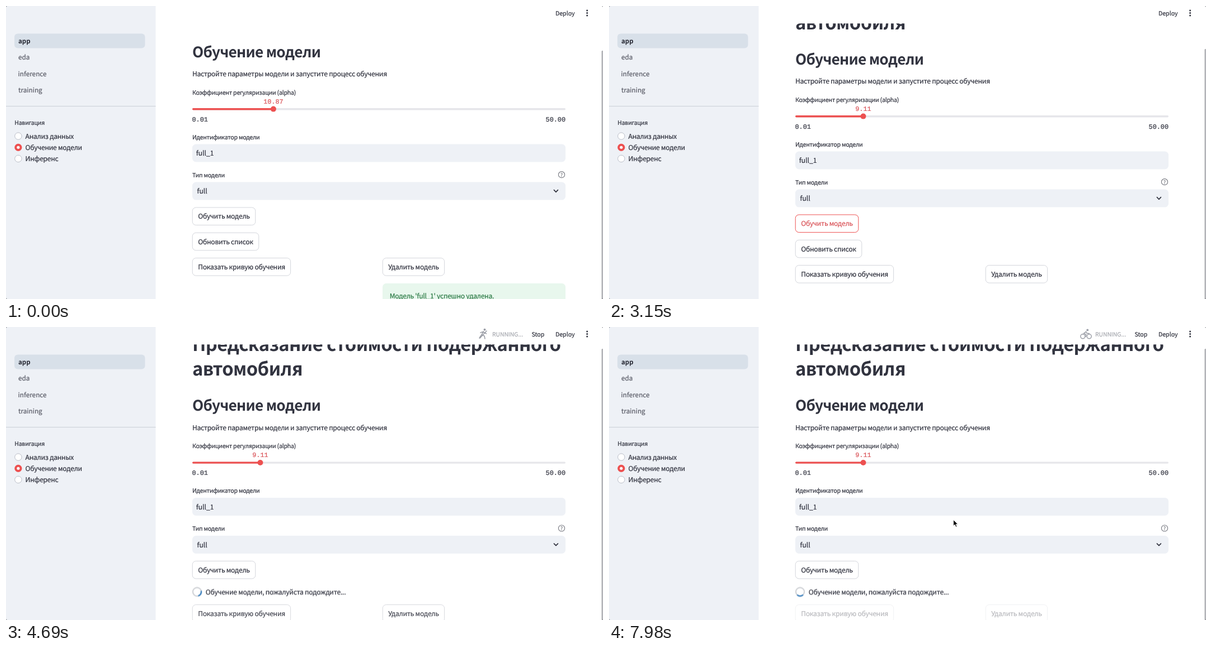
Write an HTML page that moves like this. It is 1067 px wide and 525 px high and loops after 8000 ms.

```html
<!DOCTYPE html>
<html lang="ru">
<head>
<meta charset="utf-8">
<title>Обучение модели</title>
<style>
  :root {
    --ink: #31333f; --red: #ed5050; --line: #d3d5db; --panel: #eef1f6;
    --sans: 'Noto Sans CJK SC', 'Noto Sans CJK JP', 'Noto Sans', sans-serif;
  }
  html, body { margin: 0; width: 100%; height: 100%; overflow: hidden; background: #fff; }
  svg { display: block; }
  text {
    font: 12.07px var(--sans); letter-spacing: -.0205em; color: var(--ink);
    fill: currentColor; stroke: currentColor; stroke-width: .22px;
    text-rendering: geometricPrecision; white-space: pre;
  }
  .small { font-size: 10.56px; }
  .latin, .nav, .mono { letter-spacing: 0; }
  .nav { font-size: 11.75px; color: #5b5d68; }
  .nav.on { font-weight: 700; font-size: 11.5px; color: #262833; stroke: none; }
  .mono { font: 11.8px 'Liberation Mono', monospace; }
  .h1 { font-size: 32.7px; font-weight: 700; letter-spacing: -.018em; stroke: none; }
  .h2 { font-size: 26.2px; font-weight: 700; letter-spacing: -.027em; stroke: none; }
  .field { fill: var(--panel); }
  .btn { fill: #fff; stroke: var(--line); }
  .radio { fill: #fff; stroke: #babec8; }
  .icon { fill: none; stroke: #9a9da6; stroke-width: 1.5; stroke-linecap: round; stroke-linejoin: round; }
  .icon .head { fill: #9a9da6; stroke: none; }

  .anim { animation: 8s step-end infinite; }
  #page { animation-name: scroll; }
  #tail { animation-name: push; }
  #stale { animation-name: stale; }
  #bar { animation-name: bar; }
  #done { animation-name: done; }
  #refresh { animation-name: refresh; }
  #wait { animation-name: wait; }
  #status { animation-name: status; }
  #cursor { animation-name: cursor; }
  #train rect { animation-name: press; }
  #train text { animation-name: pressText; }
  #arc { transform-origin: 341.5px 416.1px; animation: spin 8s linear infinite; }

  @keyframes scroll {
    0% { transform: translateY(0); }
    24.5% { transform: translateY(13px); }
    48.125%, 100% { transform: translateY(58.4px); }
  }
  @keyframes push {
    0% { transform: translateY(0); }
    24.5% { transform: translateY(13px); }
    55.125%, 100% { transform: translateY(46px); }
  }
  @keyframes bar {
    0% { transform: translateY(80px); }
    24.5% { transform: translateY(77px); }
    48.125%, 100% { transform: translateY(39px); }
  }
  @keyframes stale {
    0% { opacity: 1; }
    54.375% { opacity: 1; animation-timing-function: ease-in; }
    66.875%, 100% { opacity: .33; }
  }
  @keyframes done { 0% { opacity: 1; } 24.5%, 100% { opacity: 0; } }
  @keyframes refresh { 0% { opacity: 1; } 48.125%, 100% { opacity: 0; } }
  @keyframes wait { 0% { opacity: 0; } 55.125%, 100% { opacity: 1; } }
  @keyframes cursor { 0% { opacity: 0; } 98.875%, 100% { opacity: 1; } }
  @keyframes status {
    0% { opacity: 0; }
    48.125% { opacity: 0; animation-timing-function: linear; }
    51.625%, 100% { opacity: 1; }
  }
  @keyframes press {
    0% { stroke: var(--line); fill: #fff; }
    38% { stroke: var(--line); fill: #fff; animation-timing-function: linear; }
    39.375% { stroke: var(--red); fill: #fff; }
    42% { stroke: var(--red); fill: var(--red); }
    45.5% { stroke: var(--red); fill: #fff; }
    48.125% { stroke: var(--red); fill: #fff; animation-timing-function: linear; }
    51.625%, 100% { stroke: var(--line); fill: #fff; }
  }
  @keyframes pressText {
    0% { color: var(--ink); }
    38% { color: var(--ink); animation-timing-function: linear; }
    39.375% { color: #d95257; }
    42% { color: #fff; }
    45.5% { color: #d95257; }
    48.125% { color: #d95257; animation-timing-function: linear; }
    51.625%, 100% { color: var(--ink); }
  }
  @keyframes spin {
    from { transform: rotate(-1503.5deg); }
    to { transform: rotate(1265.7deg); }
  }
</style>
</head>
<body>
<svg width="1067" height="525" viewBox="0 0 1067 525">
  <rect width="1067" height="525" fill="#fff"/>

  <g id="page" class="anim">
    <text class="h1" x="333" y="-15.1">Предсказание стоимости подержанного</text>
    <text class="h1" x="333" y="29">автомобиля</text>
    <text class="h2" x="333" y="92">Обучение модели</text>
    <text x="333" y="126.4">Настройте параметры модели и запустите процесс обучения</text>

    <text class="small" x="333" y="159">Коэффициент регуляризации (alpha)</text>
    <rect x="333" y="183" width="667" height="3.4" rx="1.7" fill="#e6e6ea"/>
    <rect id="fill" x="333" y="183" width="144" height="3.4" rx="1.7" fill="var(--red)"/>
    <circle id="thumb" cx="477.9" cy="184.6" r="5" fill="var(--red)"/>
    <text id="value" class="mono" x="477.9" y="175" text-anchor="middle" style="color:#d95257">10.87</text>
    <text class="mono" x="332.5" y="207">0.01</text>
    <text class="mono" x="1000" y="207" text-anchor="end">50.00</text>

    <text class="small" x="333" y="238.6">Идентификатор модели</text>
    <rect class="field" x="333" y="247.5" width="667" height="32" rx="6.5"/>
    <text class="latin" x="339.8" y="268.3">full_1</text>

    <text class="small" x="333" y="306.6">Тип модели</text>
    <circle cx="993" cy="302.2" r="5.6" fill="none" stroke="#75777f" stroke-width="1.1"/>
    <text class="latin" x="993" y="305.5" text-anchor="middle" style="font-size:9.2px;color:#75777f">?</text>
    <rect class="field" x="333" y="315.6" width="667" height="32" rx="6.5"/>
    <text class="latin" x="341.5" y="336.2">full</text>
    <path d="M979.4 329.7l3.5 3.6 3.5-3.6" fill="none" stroke="#31333f" stroke-width="1.7" stroke-linecap="round" stroke-linejoin="round"/>

    <g id="train">
      <rect class="btn anim" x="333.2" y="361" width="112.6" height="31.6" rx="6.3"/>
      <text class="anim" x="343.2" y="381.4">Обучить модель</text>
    </g>
    <g id="refresh" class="anim">
      <rect class="btn" x="333.2" y="406.3" width="118.6" height="31.6" rx="6.3"/>
      <text x="343.2" y="426.8">Обновить список</text>
    </g>
    <g id="wait" class="anim">
      <circle cx="341.5" cy="416.1" r="7.6" fill="none" stroke="#d3d5d9" stroke-width="2.4"/>
      <path id="arc" d="M336.13 410.73A7.6 7.6 0 0 1 346.87 410.73" fill="none" stroke="#3e83c0" stroke-width="2.4"/>
      <text x="356.8" y="420.6">Обучение модели, пожалуйста подождите...</text>
    </g>
  </g>

  <g id="tail" class="anim">
    <g id="stale" class="anim">
      <rect class="btn" x="333.2" y="451.6" width="175.4" height="31.6" rx="6.3"/>
      <text x="343.2" y="472.1">Показать кривую обучения</text>
      <rect class="btn" x="673.2" y="451.6" width="110.4" height="31.6" rx="6.3"/>
      <text x="683.2" y="472.1">Удалить модель</text>
    </g>
  </g>
  <g id="done" class="anim">
    <rect x="673" y="497" width="327" height="45" rx="6.5" fill="#e8f7ed"/>
    <text x="685.7" y="524.4" style="color:#2b7a45">Модель 'full_1' успешно удалена.</text>
  </g>

  <rect x="267" width="797" height="31.3" fill="#fff"/>
  <g id="status" class="anim">
    <g class="icon">
      <g><circle class="head" cx="856" cy="5" r="2"/><path d="M854 8.5l-5 4 5 3-3 5.5M850 9l-5 2M855 9.5l5 3M853 15.5l7 3"/></g>
      <g><circle class="head" cx="855" cy="5.8" r="2"/><path d="M853.5 8.5l-2 5h5l2.5 5.5h2M853 10.5l5 1"/><circle cx="852" cy="16" r="4.6"/></g>
      <g><circle class="head" cx="855.2" cy="5.4" r="1.9"/><path d="M853 8l-4.5 3.3 4.2 2.2-.7 4M852 9l3 2.6h3"/><circle cx="846.8" cy="16.8" r="4"/><circle cx="858.2" cy="16.8" r="4"/></g>
      <g><circle class="head" cx="858" cy="10" r="2"/><path d="M844 14l6-3.5 5 4M850 10.5l4-3M843 18.5q2.5-2 5 0t5 0 5 0 4 0"/></g>
      <g><circle class="head" cx="855.5" cy="4.8" r="2"/><path d="M853.5 8l-3.5 6 5 2 1 5M850 14l-3 4-1 2M853 8.5l-5 1.5M854 9.5l4.5 2.5M847 20l12-13"/></g>
    </g>
    <text class="latin" x="869" y="16.7" style="font-size:10.3px;color:#a6a8af">RUNNING...</text>
    <text class="small latin" x="939.5" y="16.7">Stop</text>
  </g>
  <text class="small latin" x="982" y="16.7">Deploy</text>
  <g fill="#31333f">
    <circle cx="1038.6" cy="8" r="1.5"/><circle cx="1038.6" cy="12.5" r="1.5"/><circle cx="1038.6" cy="17" r="1.5"/>
  </g>
  <rect id="bar" class="anim" x="1064.4" width="4" height="486" rx="1.5" fill="#b3b4b8"/>

  <rect width="267.5" height="525" fill="var(--panel)"/>
  <rect x="15" y="49.4" width="233.5" height="26" rx="6" fill="#d8e0e9"/>
  <text class="nav on" x="22" y="67">app</text>
  <text class="nav" x="22" y="96.4">eda</text>
  <text class="nav" x="21.6" y="125.6">inference</text>
  <text class="nav" x="22" y="154.8">training</text>
  <rect y="179" width="267.5" height="1.1" fill="#cdd1d8"/>
  <text class="small" x="15.2" y="213.2">Навигация</text>
  <circle class="radio" cx="21.9" cy="233.1" r="6.2"/>
  <circle cx="21.9" cy="253.4" r="4.6" fill="#fff" stroke="var(--red)" stroke-width="4"/>
  <circle class="radio" cx="21.9" cy="273.5" r="6.2"/>
  <text x="34.6" y="237.6">Анализ данных</text>
  <text x="34.6" y="257.9">Обучение модели</text>
  <text x="34.6" y="278">Инференс</text>

  <path id="cursor" class="anim" d="M615.6 345.6v10.8l2.5-2.3 1.9 4.2 1.9-.8-1.9-4.1h3.5z" fill="#000" stroke="#fff" stroke-width=".8"/>
  <path d="M0 0h3a3 3 0 0 0-3 3zM1067 0v3a3 3 0 0 0-3-3zM0 525v-3a3 3 0 0 0 3 3zM1067 525h-3a3 3 0 0 0 3-3z" fill="#85878c"/>
</svg>
<script>
  const LOOP = 8000, STEP = 70;
  const byId = id => document.getElementById(id);
  const fill = byId('fill'), thumb = byId('thumb'), value = byId('value');
  const poses = [...document.querySelectorAll('.icon > g')];

  function drawSlider(t) {
    const k = Math.min(7, Math.max(0, Math.floor((t - 1190) / STEP) + 1));
    const alpha = 10.87 - 1.76 * k / 7;
    const x = 333 + 667 * (alpha - 0.01) / 49.99;
    fill.setAttribute('width', x - 333);
    thumb.setAttribute('cx', x);
    value.setAttribute('x', x);
    value.textContent = alpha.toFixed(2);
  }

  function drawIcon(t) {
    const now = Math.max(0, Math.floor((t - 4130) / (2 * STEP))) % poses.length;
    poses.forEach((pose, i) => { pose.style.display = i === now ? '' : 'none'; });
  }

  let start;
  function tick(now) {
    start ??= now;
    const t = (now - start) % LOOP;
    drawSlider(t);
    drawIcon(t);
    requestAnimationFrame(tick);
  }
  requestAnimationFrame(tick);
</script>
</body>
</html>
```
